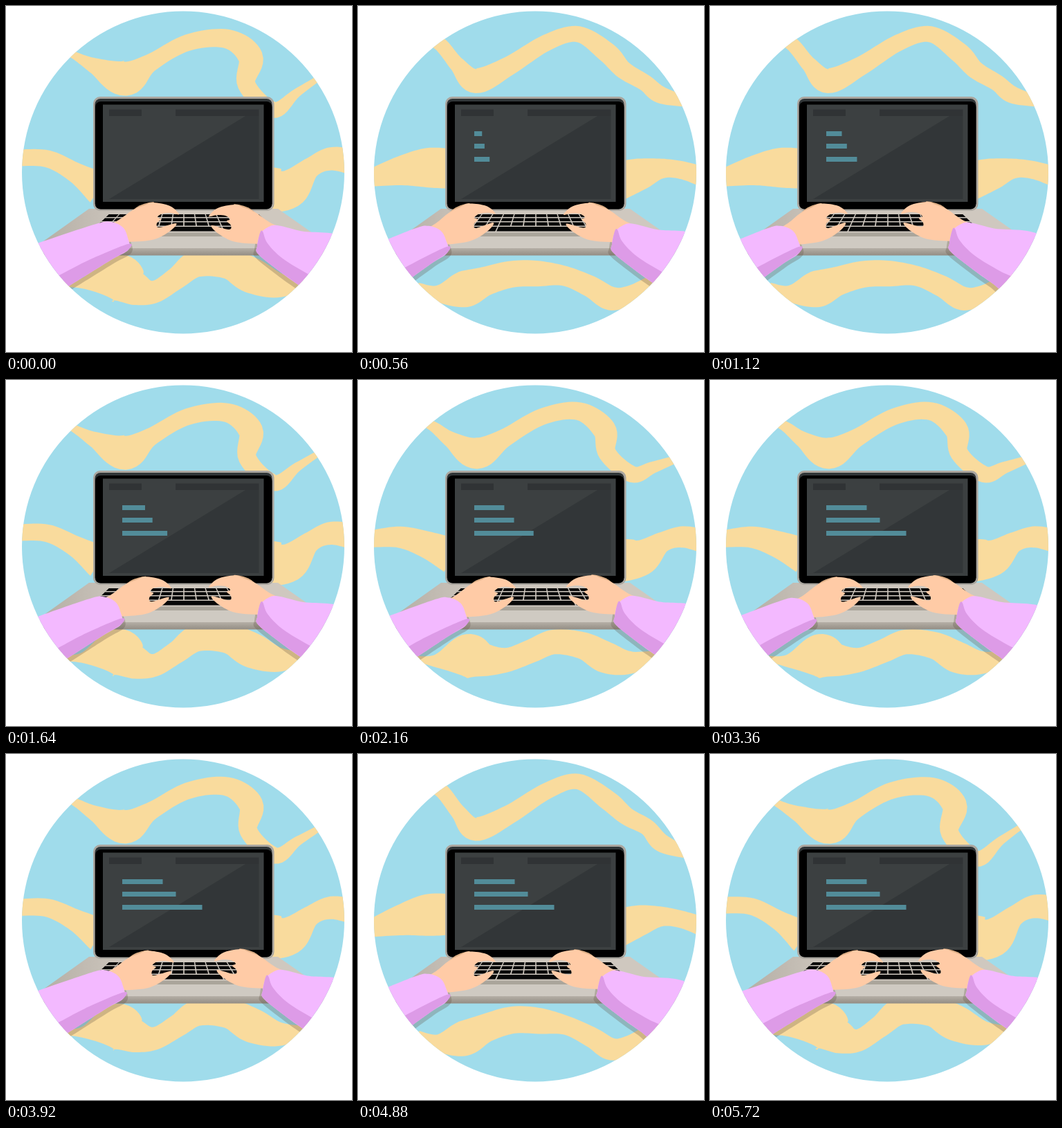
An HTML page with a canvas for the animation above (5.76 s loop, 500 px wide and 500 px high).

```html
<!DOCTYPE html>
<html lang="en">
<head>
<meta charset="utf-8">
<title>Typing on a laptop</title>
<style>
html, body { margin: 0; width: 100%; height: 100%; overflow: hidden; background: #fff; }
canvas { display: block; width: 500px; height: 500px; }
</style>
</head>
<body>
<canvas id="stage"></canvas>
<script>
const LOOP = 5760, CYCLE = 1920, STEP = 40, TYPING = 2910;
const SKY = '#a0dceb', SAND = '#f9db9d', SKIN = '#ffcba6', SKIN_DARK = '#dcae85';
const SLEEVE = '#f3b9ff', CUFF = '#dd9be7', SHADOW = 'rgba(95,80,65,.28)';

const canvas = document.getElementById('stage');
const ratio = window.devicePixelRatio || 1;
canvas.width = canvas.height = 500 * ratio;
const ctx = canvas.getContext('2d');
ctx.scale(ratio, ratio);

// Each ribbon swings between two centre lines of [x, y, half width].
const ribbons = [
  {
    from: [[80, 62, 4], [103, 75, 6], [128, 87, 12], [172, 104, 26], [208, 82, 13], [262, 53, 12],
      [320, 48, 14], [353, 74, 18], [346, 115, 13], [385, 152, 12], [420, 125, 6], [465, 93, 3]],
    to: [[98, 42, 10], [122, 50, 11], [147, 84, 11], [170, 109, 16], [220, 88, 14], [275, 53, 12],
      [318, 39, 11], [362, 66, 14], [393, 87, 13], [422, 101, 12], [441, 129, 14], [480, 150, 8]]
  },
  {
    from: [[15, 218, 12], [60, 220, 12], [100, 241, 14], [135, 265, 24]],
    to: [[15, 257, 12], [60, 243, 23], [100, 232, 32], [135, 228, 30]]
  },
  {
    from: [[375, 266, 34], [410, 264, 29], [440, 234, 15], [470, 220, 17], [505, 225, 19]],
    to: [[375, 250, 27], [410, 237, 21], [440, 235, 14], [470, 242, 12], [505, 255, 14]]
  },
  {
    from: [[80, 402, 4], [112, 400, 8], [160, 392, 35], [190, 410, 24], [215, 414, 16], [245, 394, 16],
      [275, 371, 20], [320, 371, 22], [355, 388, 26], [395, 403, 18], [440, 400, 5]],
    to: [[88, 403, 3], [115, 419, 13], [150, 414, 24], [185, 394, 20], [225, 381, 20], [265, 385, 19],
      [305, 395, 13], [340, 414, 14], [368, 431, 15], [395, 420, 12], [440, 390, 12]]
  }
];

// One hand serves both arms; the right one is mirrored.
const hand = [140,322, 163,309, 183,295, 200,288, 213,284, 237,289, 250,301, 238,299, 226,300,
  219,305, 224,308, 218,314, 221,320, 246,314, 236,326, 211,338, 170,341, 145,340];
const knuckle = [180,300, 190,290, 203,285, 214,284, 203,294];
const leftSleeve = [20,352, 48,342, 130,315, 152,312, 169,320, 176,335, 177,352, 150,368, 92,404, 40,436];
const leftFold = [30,412, 79,388, 120,367, 176,344, 177,352, 150,368, 92,404, 40,436];
const rightSleeve = [363,347, 367,330, 378,320, 392,317, 425,325, 500,342, 480,440, 424,404, 392,381, 364,358];
const rightFold = [363,347, 367,328, 371,326, 378,343, 400,365, 436,387, 470,405, 460,430, 424,404, 392,381, 364,358];

// Keyframes: [time in cycle, values...]
const leftReach = [[0, 0], [560, 1], [1200, 1], [1760, 0], [1920, 0]];
const rightShift = [[0, 0, 0], [80, 8, -5], [240, 8, -5], [880, 0, 0], [1040, -17, -4],
  [1120, -17, -4], [1880, 8, -5], [1920, 0, 0]];

const mix = (a, b, k) => a.map((v, i) => v + (b[i] - v) * k);

function at(keys, t) {
  let i = 1;
  while (keys[i][0] < t) i++;
  const a = keys[i - 1], b = keys[i];
  return mix(a, b, (t - a[0]) / (b[0] - a[0])).slice(1);
}

function poly(p, color) {
  ctx.beginPath();
  for (let i = 0; i < p.length; i += 2) ctx.lineTo(p[i], p[i + 1]);
  ctx.closePath();
  ctx.fillStyle = color;
  ctx.fill();
}

function box(x, y, x2, y2, color, r = 0) {
  ctx.beginPath();
  ctx.roundRect(x, y, x2 - x, y2 - y, r);
  ctx.fillStyle = color;
  ctx.fill();
}

// Closed smooth curve through the points.
function blob(p, color, dx = 0, dy = 0) {
  const n = p.length / 2;
  const x = i => p[(i + n) % n * 2] + dx, y = i => p[(i + n) % n * 2 + 1] + dy;
  ctx.beginPath();
  ctx.moveTo(x(0), y(0));
  for (let i = 0; i < n; i++) {
    ctx.bezierCurveTo(
      x(i) + (x(i + 1) - x(i - 1)) / 6, y(i) + (y(i + 1) - y(i - 1)) / 6,
      x(i + 1) - (x(i + 2) - x(i)) / 6, y(i + 1) - (y(i + 2) - y(i)) / 6,
      x(i + 1), y(i + 1));
  }
  ctx.fillStyle = color;
  ctx.fill();
}

// Point on an open Catmull-Rom spline.
function along(points, pos) {
  const last = points.length - 1, i = Math.min(Math.floor(pos), last - 1), u = pos - i;
  const [a, b, c, d] = [-1, 0, 1, 2].map(o => points[Math.max(0, Math.min(last, i + o))]);
  return b.map((v, n) => v + u / 2 * (c[n] - a[n] +
    u * (2 * a[n] - 5 * v + 4 * c[n] - d[n] + u * (3 * (v - c[n]) + d[n] - a[n]))));
}

function ribbon({ from, to }, k) {
  const points = from.map((p, i) => mix(p, to[i], k));
  const upper = [], lower = [], last = points.length - 1, e = .02;
  for (let s = 0; s <= last * 10; s++) {
    const pos = s / 10, [x, y, w] = along(points, pos);
    const a = along(points, Math.max(0, pos - e)), b = along(points, Math.min(last, pos + e));
    const tx = b[0] - a[0], ty = b[1] - a[1], f = w / (Math.hypot(tx, ty) || 1);
    upper.push(x + ty * f, y - tx * f);
    lower.unshift(x - ty * f, y + tx * f);
  }
  poly([...upper, ...lower], SAND);
}

function gradient(x, y, x2, y2, ...colors) {
  const g = ctx.createLinearGradient(x, y, x2, y2);
  colors.forEach((c, i) => g.addColorStop(i / (colors.length - 1), c));
  return g;
}

function keyboard() {
  const rows = [301, 306.5, 312.5, 319, 327], count = 14, gap = .0035;
  const edge = (y, k) => 257 + (k - .5) * (218 + (y - 301) * 2.1);
  const key = (r, first, end) => {
    const y = rows[r], y2 = rows[r + 1] - 1.4, a = first / count + gap, b = end / count - gap;
    poly([edge(y, a), y, edge(y, b), y, edge(y2, b), y2, edge(y2, a), y2], '#080808');
  };
  for (let r = 0; r < 3; r++) for (let i = 0; i < count; i++) key(r, i, i + 1);
  for (let i = 0; i < 4; i++) {
    key(3, i, i + 1);
    key(3, count - i - 1, count - i);
  }
  key(3, 4, 10);
}

function laptop(typed) {
  poly([120, 293, 393, 293, 460, 340, 460, 360, 54, 360, 54, 340],
    gradient(54, 0, 180, 0, '#b5afa6', '#cfc8bf'));
  box(125, 327.5, 390, 333, '#aaa59b');
  box(100, 333, 415, 350, '#cfcac2');
  box(90, 350, 430, 360.5, gradient(0, 350, 0, 360, '#b5afa6', '#958f86'));
  keyboard();

  box(126, 131, 387.5, 296, '#aaa69f', 10);
  box(128.5, 134, 384.5, 293.5, '#303537', 8);
  box(129, 138, 384.5, 293.5, '#000', 8);
  box(140, 142.5, 372.5, 283, '#3c4041');
  box(149, 149.5, 196, 159, '#303335');
  box(245, 149.5, 365.5, 159, '#303335');
  poly([149, 279, 346, 159, 365.5, 159, 365.5, 279], '#323638');
  [58.5, 77.5, 115.5].forEach((w, i) => {
    const y = Math.floor(181 + i * 18.5);
    box(168, y, 168 + w * typed, y + 7, '#528c99');
  });
}

function drawHand() {
  blob(knuckle, SKIN_DARK);
  blob(hand, SKIN);
}

function drawSleeve(sleeve, fold) {
  blob(sleeve, SLEEVE);
  blob(fold, CUFF);
}

function leftArm(u) {
  ctx.save();
  ctx.translate(176 - 48 * u, 345 + 4 * u);
  ctx.rotate(-.07 * u);
  ctx.translate(-176, -345);
  blob(leftSleeve, SHADOW, 4, 5);
  drawHand();
  drawSleeve(leftSleeve, leftFold);
  ctx.restore();
}

function rightArm(dx, dy) {
  ctx.save();
  ctx.translate(dx, dy);
  blob(rightSleeve, SHADOW, -4, 5);
  ctx.save();
  ctx.translate(543, 3);
  ctx.scale(-1, 1);
  drawHand();
  ctx.restore();
  drawSleeve(rightSleeve, rightFold);
  ctx.restore();
}

function draw(time) {
  const t = Math.floor(time % LOOP / STEP) * STEP, phase = t % CYCLE;
  ctx.fillStyle = '#fff';
  ctx.fillRect(0, 0, 500, 500);
  ctx.save();
  ctx.beginPath();
  ctx.arc(256, 240.5, 233, 0, Math.PI * 2);
  ctx.fillStyle = SKY;
  ctx.fill();
  ctx.clip();

  const sway = .5 - .5 * Math.cos((phase + 120) / CYCLE * Math.PI * 2);
  ribbons.forEach(r => ribbon(r, sway));
  laptop(Math.min(1, t / TYPING));
  leftArm(...at(leftReach, phase));
  rightArm(...at(rightShift, phase));
  ctx.restore();
}

const start = performance.now();
function tick() {
  draw(performance.now() - start);
  requestAnimationFrame(tick);
}
tick();
</script>
</body>
</html>
```
